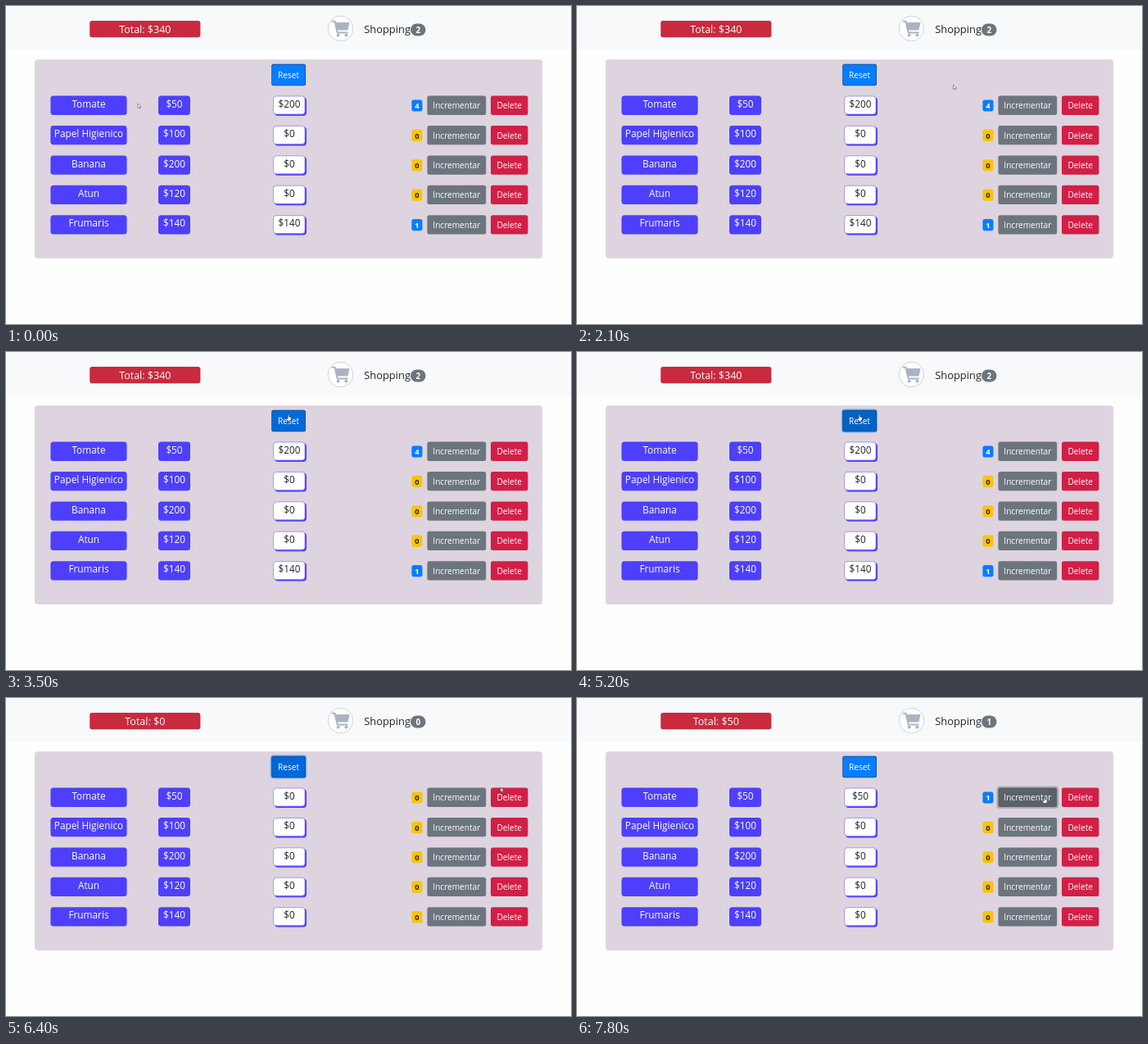
Animation, 690 px wide and 388 px high, one loop 8 s. Source, as an HTML page:

```html
<!DOCTYPE html>
<html lang="es">
<head>
<meta charset="utf-8">
<title>Shopping list</title>
<style>
  html, body { margin: 0; width: 100%; height: 100%; overflow: hidden; background: #fefefe; }
  svg { display: block; width: 100%; height: 100%; }
  text { font: 11.8px "Open Sans", "Noto Sans", sans-serif; fill: #fff; text-anchor: middle; }
  .btn { font-size: 10.1px; }
  .badge { font-size: 9.4px; font-weight: 700; }
  .dark { fill: #212529; }
</style>
</head>
<body>
<svg id="stage" viewBox="0 0 690 388" preserveAspectRatio="none">
  <rect width="690" height="53.5" fill="#f8f9fb"/>
  <rect x="102.2" y="18" width="135.2" height="20.2" rx="3" fill="#c92a3d"/>
  <text id="sum" x="169.8" y="33" style="font-size:12.5px"></text>

  <circle cx="408.5" cy="27.5" r="15.3" fill="#fff" stroke="#c6ced9" stroke-width=".9"/>
  <g fill="#aab3c2" stroke="#aab3c2" stroke-linejoin="round" stroke-linecap="round">
    <path d="M402.4 20.6H419L417 29H404.2z"/>
    <path d="M398.8 18.8H401.6L404.7 32.4H416.8" fill="none" stroke-width="2"/>
    <circle cx="405.6" cy="35.6" r="1.5"/>
    <circle cx="415.4" cy="35.6" r="1.5"/>
  </g>
  <text class="dark" x="465.6" y="32.8" style="font-size:12.9px">Shopping</text>
  <rect x="494" y="21.5" width="18.5" height="15" rx="7.5" fill="#6c757d"/>
  <text id="count" class="badge" x="503.2" y="32.6" style="font-size:9.9px"></text>

  <rect x="35" y="65.3" width="620" height="242.7" rx="4" fill="#ddd4df"/>
  <g id="ui"></g>

  <path id="arrow" d="M0 0V5.6L1.3 4.5L2.2 6.3L3 5.9L2.3 4.1H4z" fill="#fff" stroke="#555" stroke-width=".6"/>
  <path id="hand" d="M-.8 .7Q0 -.5 .8 .7V3.1L3 3.7Q3.6 4 3.4 5L2.7 8H-1.2L-3 5.3Q-2.8 4.2 -1.7 4.9L-.8 5.4z" fill="#fff" stroke="#222" stroke-width=".6"/>
</svg>

<script>
const LOOP = 8000, STEP = 100;
const TOP = 109.6, GAP = 36.4, HIGH = 23.3;
const PURPLE = "#4e3ffc";
const BLUE = { base: "#077dff", hover: "#0069d9", press: "#0062c4", ring: "#268fff" };
const GREY = { base: "#6c757d", hover: "#5a6268", press: "#545b62", ring: "#828a91" };
const RED = { base: "#d11f46", hover: "#b81b3d" };

const items = [
  ["Tomate", 50, 4], ["Papel Higienico", 100, 0], ["Banana", 200, 0],
  ["Atun", 120, 0], ["Frumaris", 140, 1]
];
const clickReset = 5200, clickAdd = 7500;

// Pointer moves: start, end, x, y
const home = [161, 119];
const moves = [
  [0, 700, 337, 369], [800, 900, 446, 319], [1100, 2000, 478, 103],
  [2000, 2100, 459.5, 96], [2100, 2400, 419, 89], [3100, 3500, 345, 76],
  [5500, 5700, 366, 90], [5700, 6400, 604, 109], [6400, 6600, 606, 117],
  [6800, 7100, 571, 120.5]
];

const $ = id => document.getElementById(id);
const set = (el, key, value) => el.setAttribute(key, value);
const show = (el, on) => set(el, "visibility", on ? "visible" : "hidden");

function add(type, attrs, label = "") {
  const el = document.createElementNS("http://www.w3.org/2000/svg", type);
  for (const key in attrs) set(el, key, attrs[key]);
  el.textContent = label;
  $("ui").append(el);
  return el;
}
const box = (x, y, width, height, rx, fill, more) =>
  add("rect", { x, y, width, height, rx, fill, ...more });
const text = (x, y, label, cls = "") => add("text", { x, y, class: cls }, label);

function button(x, y, w, h, label, tone, edge) {
  const ring = box(x - 2, y - 2, w + 4, h + 4, 4, tone.ring, { "fill-opacity": .52 });
  if (edge) box(x - .6, y - .6, w + 1.4, h + 1.4, 2.5, edge);
  const face = box(x, y, w, h, 2.5, tone.base);
  text(x + w / 2, y + h / 2 + 4, label, "btn");
  show(ring, false);
  return {
    hit: (px, py) => px > x && px < x + w && py > y && py < y + h,
    paint(mode, focus) {
      set(face, "fill", tone[mode]);
      show(ring, focus);
    }
  };
}

function tag(x, y, w, label) {
  box(x, y, w, HIGH, 3.5, PURPLE);
  text(x + w / 2, y + 14.2, label);
}

const reset = button(324.8, 71.4, 40.4, 25, "Reset", BLUE, "#174a86");
const rows = items.map(([name, price], i) => {
  const y = TOP + i * GAP;
  tag(54.4, y, 93.2, name);
  tag(186, y, 39, "$" + price);
  box(328, y + 1.6, 39, 22.8, 4, PURPLE);
  box(326.6, y + .4, 38.4, 22, 3.5, "#fff", { stroke: "#8177f0", "stroke-width": .7 });
  return {
    total: text(346, y + 14.2, "", "dark"),
    badge: box(495.4, y + 4.8, 13.1, 14.2, 2.8, ""),
    qty: text(502, y + 15.5, "", "badge"),
    inc: button(514.4, y, 71.8, HIGH, "Incrementar", GREY),
    del: button(592, y, 45.4, HIGH, "Delete", RED)
  };
});

function pointerAt(t) {
  let [x, y] = home;
  for (const [start, end, toX, toY] of moves) {
    const u = Math.min(1, Math.max(0, (t - start) / (end - start)));
    const k = u * u * (3 - 2 * u);
    x += (toX - x) * k;
    y += (toY - y) * k;
  }
  return [x, y];
}

function draw(t) {
  let sum = 0, count = 0;
  items.forEach(([, price, start], i) => {
    const n = t <= clickReset ? start : +(i === 0 && t > clickAdd);
    const { total, badge, qty } = rows[i];
    sum += n * price;
    count += n > 0;
    total.textContent = "$" + n * price;
    qty.textContent = n;
    qty.style.fill = n ? "#fff" : "#212529";
    set(badge, "fill", n ? "#087cff" : "#fbc30c");
  });
  $("sum").textContent = "Total: $" + sum;
  $("count").textContent = count;

  const [x, y] = pointerAt(t);
  const { inc, del } = rows[0];
  const onReset = t >= clickReset && t < clickAdd, onAdd = t >= clickAdd;
  const mode = (b, focus, click) => t === click ? "press" : focus || b.hit(x, y) ? "hover" : "base";
  reset.paint(mode(reset, onReset, clickReset), onReset);
  inc.paint(mode(inc, onAdd, clickAdd), onAdd);
  del.paint(mode(del), false);

  const hand = [reset, inc, del].some(b => b.hit(x, y));
  for (const id of ["arrow", "hand"]) {
    set($(id), "transform", `translate(${x} ${y})`);
    show($(id), hand === (id === "hand"));
  }
}

const begin = performance.now();
let last = -1;
function tick() {
  const t = Math.floor((performance.now() - begin) % LOOP / STEP) * STEP;
  if (t !== last) draw(last = t);
  requestAnimationFrame(tick);
}
tick();
</script>
</body>
</html>
```
